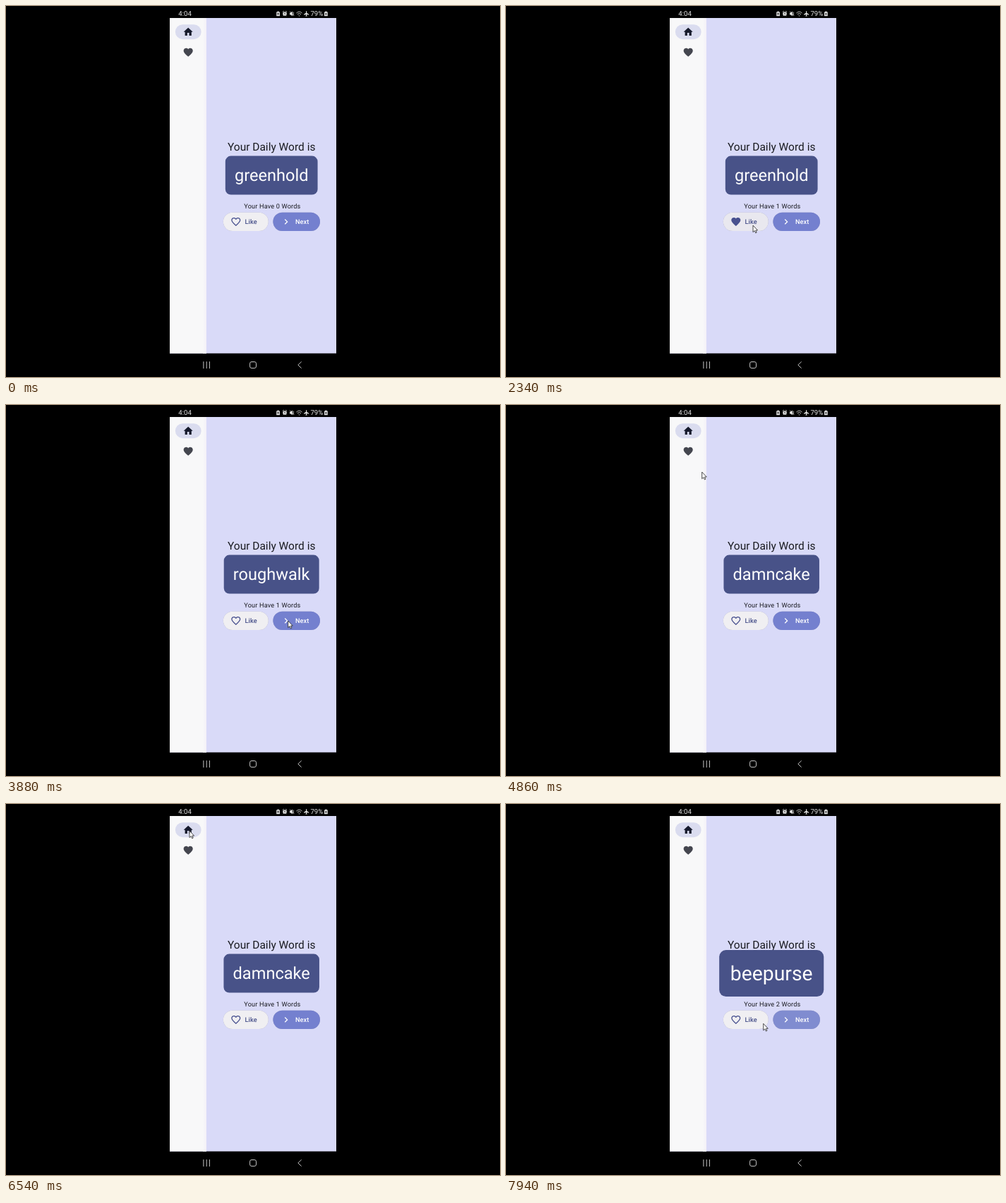
An HTML page that plays this animation: 700x526 px, repeating every 8000 ms.

```html
<!DOCTYPE html>
<html lang="en">
<head>
<meta charset="utf-8">
<title>Daily word</title>
<style>
  html, body { margin: 0; width: 100%; height: 100%; overflow: hidden; background: #000; }
  svg { display: block; width: 100%; height: 100%; }
  text { font-family: Roboto, sans-serif; fill: #1a1b21; text-rendering: geometricPrecision; }
  .mid { text-anchor: middle; }
  .status { font-size: 9.6px; fill: #e4e4e4; }
  .body { letter-spacing: .164px; }
  .label { font-size: 9.18px; font-weight: 500; letter-spacing: .066px; }
  .raised { filter: drop-shadow(0 .6px .6px rgba(40, 40, 70, .35)); }
  .line { fill: none; stroke: #c4c4c4; stroke-width: 1; }
  #word { font-size: 23.6px; fill: #fff; }
</style>
</head>
<body>
<svg viewBox="0 0 700 526">
  <defs>
    <path id="home" d="M10 20v-6h4v6h5v-8h3L12 3 2 12h3v8z"/>
    <path id="heart" d="M12 21.35l-1.45-1.32C5.4 15.36 2 12.28 2 8.5 2 5.42 4.42 3 7.5 3c1.74 0 3.41.81 4.5 2.09C13.09 3.81 14.76 3 16.5 3 19.58 3 22 5.42 22 8.5c0 3.78-3.4 6.86-8.55 11.54z"/>
    <path id="heartLine" d="M16.5 3c-1.74 0-3.41.81-4.5 2.09C10.91 3.81 9.24 3 7.5 3 4.42 3 2 5.42 2 8.5c0 3.78 3.4 6.86 8.55 11.54L12 21.35l1.45-1.32C18.6 15.36 22 12.28 22 8.5 22 5.42 19.58 3 16.5 3zm-4.4 15.55l-.1.1-.1-.1C7.14 14.24 4 11.39 4 8.5 4 6.5 5.5 5 7.5 5c1.54 0 3.04.99 3.57 2.36h1.87C13.46 5.99 14.96 5 16.5 5c2 0 3.5 1.5 3.5 3.5 0 2.89-3.14 5.74-7.9 10.05z"/>
    <path id="bin" d="M6 19c0 1.1.9 2 2 2h8c1.1 0 2-.9 2-2V7H6zM19 4h-3.5l-1-1h-5l-1 1H5v2h14z"/>
    <linearGradient id="edge">
      <stop offset="0" stop-color="#f8f8f9"/>
      <stop offset="1" stop-color="#f3f0f8"/>
    </linearGradient>
  </defs>

  <rect width="700" height="526"/>
  <rect x="232" y="17" width="236" height="475.5" fill="#d9daf8"/>
  <rect x="232" y="17" width="52" height="475.5" fill="#f8f8f9"/>
  <rect x="279" y="17" width="5" height="475.5" fill="url(#edge)"/>

  <!-- status bar -->
  <text class="status" x="244.3" y="14.2">4:04</text>
  <text class="status" x="431.4" y="14.2">79%</text>
  <g fill="#dedede">
    <path d="M384.6 7.6h2v.8h1.4v5.8h-4.8V8.4h1.4z"/>
    <circle cx="395" cy="11" r="2.8"/>
    <path d="M392 8.6l1.6-1.4M398 8.6l-1.6-1.4M392.6 14.2l1-1M397.4 14.2l-1-1" stroke="#dedede"/>
    <path d="M402 9.5h1.6l2.4-2v7l-2.4-2H402z"/>
    <path d="M402.2 7.5l6 6.5M407.4 8.5v4.5" stroke="#dedede" stroke-width=".8"/>
    <path d="M425 7.2h1.2v2.5l3 2v1l-3-.8v1.7l1 .9h-3.2l1-.9v-1.7l-3 .8v-1l3-2z"/>
    <path d="M452.4 7.6h2v.8h1.4v5.8H451V8.4h1.4z"/>
  </g>
  <path d="M411.5 10q4-3.8 8 0M413 11.7q2.5-2.3 5 0M414.5 13.3l1 .9 1-.9" class="line"/>
  <path d="M384.8 10.2h1.6v1.8h-1.6zM394.8 9.6v1.6h1.2M452.6 10.6h1.6v1.5h-1.6z" fill="none" stroke="#111" stroke-width=".7"/>

  <!-- system navigation -->
  <path class="line" d="M279.9 504v10M284.2 504v10M288.4 504v10M418.6 504.2l-4.7 4.7 4.7 4.7"/>
  <rect class="line" x="345.6" y="504.5" width="8.9" height="8.9" rx="2.4"/>

  <!-- rail -->
  <rect id="pill" x="239.9" width="36.7" height="21" rx="10.5" fill="#dadcef"/>
  <use id="railHome" href="#home" transform="translate(258.2 36.7) scale(.6556) translate(-12 -12)"/>
  <use id="railHeart" href="#heart" transform="translate(258.2 65.7) scale(.6556) translate(-12 -12)"/>

  <g id="homePage">
    <text class="mid" x="376.2" y="204.7" font-size="15.5">Your Daily Word is</text>
    <text id="count" class="mid body" x="377.4" y="286.9" font-size="9.18"></text>
    <rect id="likeBox" class="raised" x="307.8" y="292.7" width="64" height="26.3" rx="13.15"/>
    <use id="likeIcon" fill="#48518f" transform="translate(325.8 305.9) scale(.6556) translate(-12 -12)"/>
    <text class="label" x="338.5" y="309.1" style="fill:#48518a">Like</text>
    <rect id="nextBox" class="raised" x="378.4" y="292.7" width="66.6" height="26.3" rx="13.15"/>
    <path d="M395.2 302.5l3.4 3.4-3.4 3.4" fill="none" stroke="#fff" stroke-width="1.3"/>
    <text class="label" x="409.9" y="309.1" style="fill:#fff">Next</text>
    <g id="card">
      <rect id="cardBox" y="-27.5" height="55" rx="7.9" fill="#485288"/>
      <text id="word" class="mid" y="8.2"></text>
    </g>
  </g>

  <g id="listPage">
    <text class="mid body" x="376.2" y="73.8" font-size="9.83" font-weight="700">Your Favorites Random English Words</text>
    <rect class="raised" x="287.2" y="79.2" width="178" height="36.7" rx="7.9" fill="#f0eff1"/>
    <text x="297.3" y="101.2" font-size="10.49" letter-spacing=".328">GreenHold</text>
    <use href="#bin" fill="#cb1533" transform="translate(441.8 98) scale(.6556) translate(-12 -12)"/>
    <text class="mid body" x="377.2" y="127.6" font-size="7.867">Tap The Word To Open It With Dopula</text>
  </g>

  <path id="cursor" d="M0 0V9.6L2.2 7.6 3.7 10.8 5.2 10.1 3.8 7H6.6Z" fill="#fafafa" stroke="#222" stroke-width=".8"/>
</svg>
<script>
const LOOP = 8000, START = 100, STEP = 140;
const el = Object.fromEntries([...document.querySelectorAll('[id]')].map(n => [n.id, n]));

// time, x, y of the pointer tip
const pointer = [
  [940, 372, 317], [1500, 356, 314], [1920, 350, 311], [2620, 350, 311],
  [3180, 399, 306], [4300, 400, 306], [4860, 277.7, 95], [5140, 262, 66],
  [5420, 262, 66], [5700, 309.7, 80.5], [5980, 312, 86], [6260, 260, 38],
  [6540, 260, 38], [7240, 337.7, 318.5], [7520, 350, 309],
  [7800, 393, 306], [7940, 364.7, 311.3]
];
// time, word
const words = [[0, 'greenhold'], [3460, 'roughwalk'], [4160, 'damncake'], [7800, 'beepurse']];
const likes = [2060, 7520];
const listOpen = [5280, 6400];

const mix = (a, b, k) => a + (b - a) * k;
const ease = k => k * k * (3 - 2 * k);

function pointerAt(t) {
  const i = pointer.findIndex(p => p[0] > t);
  if (i < 0) return pointer.at(-1).slice(1);
  const a = pointer[i - 1], b = pointer[i], k = ease((t - a[0]) / (b[0] - a[0]));
  return [mix(a[1], b[1], k), mix(a[2], b[2], k)];
}

function setWord(word) {
  if (el.word.textContent === word) return;
  el.word.textContent = word;
  const width = el.word.getComputedTextLength() + 26.2;
  el.cardBox.setAttribute('width', width);
  el.cardBox.setAttribute('x', -width / 2);
}

function render(t) {
  const onList = t >= listOpen[0] && t < listOpen[1];
  el.homePage.style.display = onList ? 'none' : '';
  el.listPage.style.display = onList ? '' : 'none';
  el.pill.setAttribute('y', onList ? 55.2 : 26.2);
  el.railHome.setAttribute('fill', onList ? '#44464f' : '#161a2c');
  el.railHeart.setAttribute('fill', onList ? '#161a2c' : '#44464f');

  const [since, word] = words.findLast(w => t >= w[0]);
  const age = t - since;
  if (!onList) setWord(word);
  const pop = since && age < 420 ? 0.2 * Math.sin(Math.PI * (age + STEP) / 560) : 0;
  el.card.setAttribute('transform', `translate(376.2 240.1) scale(${1 + pop})`);

  const liked = likes.some(at => at >= since && t >= at);
  el.count.textContent = `Your Have ${likes.filter(at => t >= at).length} Words`;
  el.likeIcon.setAttribute('href', liked ? '#heart' : '#heartLine');
  el.likeBox.setAttribute('fill', liked ? '#e9e8ef' : '#f0eff2');
  el.nextBox.setAttribute('fill', since && age < 280 ? '#808cd0' : '#7480cf');

  const shown = t >= pointer[0][0];
  el.cursor.style.display = shown ? '' : 'none';
  if (shown) el.cursor.setAttribute('transform', `translate(${pointerAt(t)})`);
}

const origin = performance.now();
function tick() {
  const t = (performance.now() - origin) % LOOP;
  render(t < START ? 0 : START + STEP * Math.floor((t - START) / STEP));
  requestAnimationFrame(tick);
}
tick();
</script>
</body>
</html>
```
